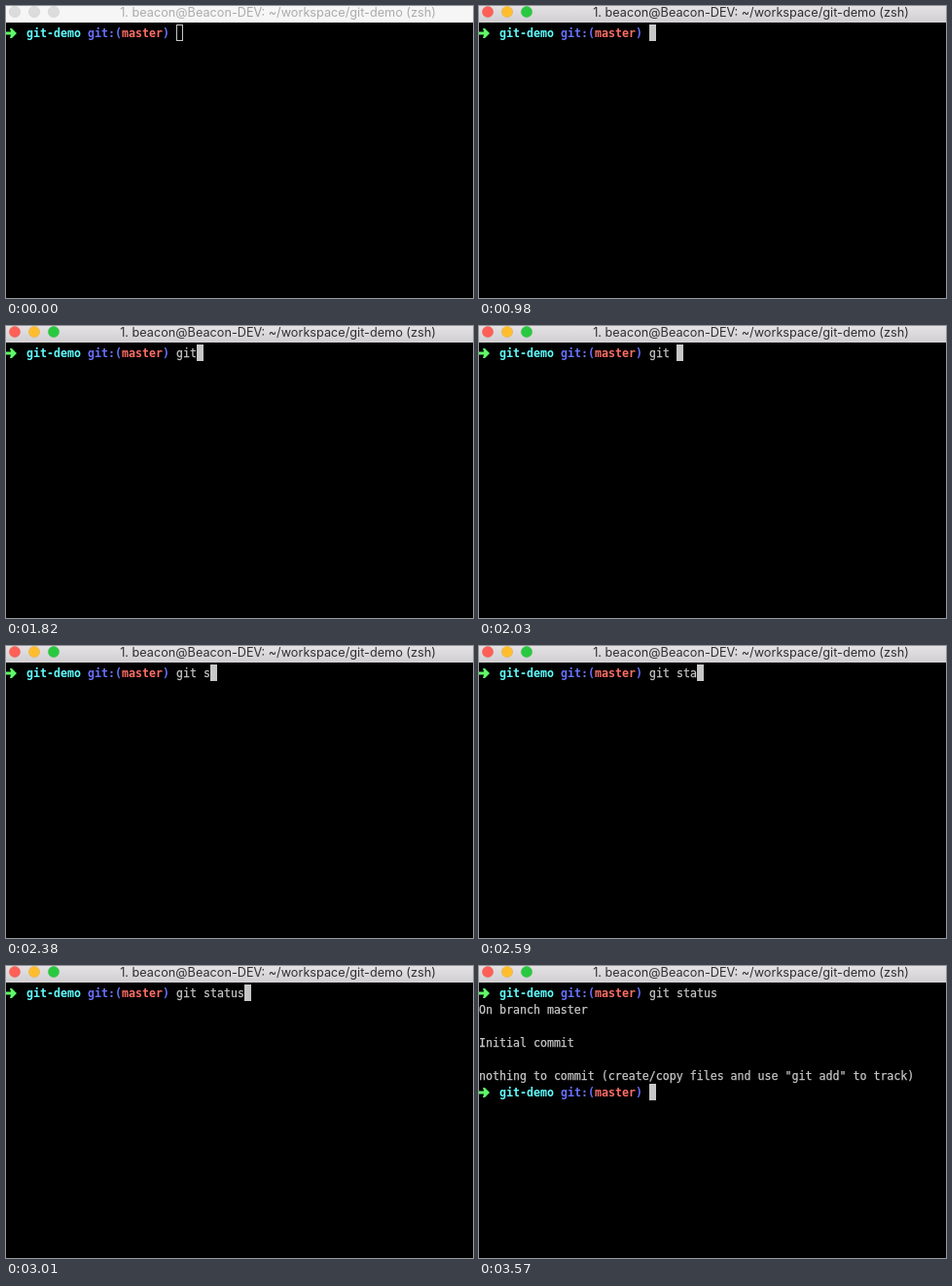
Write an HTML page that moves like this. It is 480 by 300 pixels and loops after 5.32 s.

```html
<!DOCTYPE html>
<html lang="en">
<head>
<meta charset="utf-8">
<title>git status</title>
<style>
  html, body { margin: 0; width: 100%; height: 100%; overflow: hidden; background: #000; }
  svg { display: block; }
  text { white-space: pre; }
  .term { font: 11.627px "DejaVu Sans Mono", monospace; fill: #c7c7c7; }
  .term > text, #output > text { stroke: #c7c7c7; stroke-width: .25; }
  .bold { font-weight: bold; }
  .title { font: 12.7px Inter, sans-serif; text-anchor: middle; fill: #303030; }
  .bar { fill: url(#chrome); }
  .lights { stroke: #000; stroke-opacity: .12; stroke-width: .5; }
  .idle .bar { fill: #f6f6f6; }
  .idle .title { fill: #acacac; }
  .idle .lights circle { fill: #dcdcdc; }
</style>
</head>
<body>
<svg width="480" height="300" viewBox="0 0 480 300">
  <defs>
    <linearGradient id="chrome" x2="0" y2="1">
      <stop stop-color="#e4e2e4"/>
      <stop offset="1" stop-color="#d0ced0"/>
    </linearGradient>
    <g id="prompt">
      <path fill="#5ffa68" d="M0 7.5h5L4 4h2L11 9 6 14H4l1-3.5H0z"/>
      <text class="bold" y="13">
        <tspan x="21" fill="#60fdff">git-demo</tspan>
        <tspan x="84" fill="#6871ff">git:(</tspan>
        <tspan x="119" fill="#ff6e67">master</tspan>
        <tspan x="161" fill="#6871ff">)</tspan>
      </text>
    </g>
  </defs>
  <rect width="480" height="300"/>
  <g id="window">
    <rect class="bar" width="480" height="17"/>
    <g class="lights">
      <circle cx="9" cy="6" r="5.75" fill="#ff5f57"/>
      <circle cx="29" cy="6" r="5.75" fill="#ffbd2e"/>
      <circle cx="49" cy="6" r="5.75" fill="#28c940"/>
    </g>
    <text class="title" x="279.5" y="11">1. beacon@Beacon-DEV: ~/workspace/git-demo (zsh)</text>
  </g>
  <g class="term" transform="translate(0 19)">
    <use href="#prompt"/>
    <text id="command" x="175" y="13"></text>
    <g id="output">
      <text y="30">On branch master</text>
      <text y="64">Initial commit</text>
      <text y="98">nothing to commit (create/copy files and use "git add" to track)</text>
      <use href="#prompt" y="102"/>
    </g>
    <rect id="cursor" x="175.5" y=".5" width="6" height="16" stroke="#c7c7c7"/>
  </g>
</svg>
<script>
const LOOP = 5320, FOCUS = 980, ENTER = 3570;
const CELL = 7, ROW = 17;
const COMMAND = "git status";
const KEY_TIMES = [1540, 1680, 1820, 2030, 2380, 2450, 2590, 2660, 2800, 3010];
const el = id => document.getElementById(id);
const [win, command, output, cursor] = ["window", "command", "output", "cursor"].map(el);

function draw() {
  const t = performance.now() % LOOP;
  const typed = KEY_TIMES.filter(k => k <= t).length;
  const focused = t >= FOCUS, done = t >= ENTER;

  win.classList.toggle("idle", !focused);
  command.textContent = COMMAND.slice(0, typed);
  output.style.display = done ? "" : "none";
  cursor.setAttribute("fill", focused ? "#c7c7c7" : "#000");
  cursor.setAttribute("transform", done ? `translate(0 ${6 * ROW})` : `translate(${typed * CELL} 0)`);
  requestAnimationFrame(draw);
}
draw();
</script>
</body>
</html>
```
